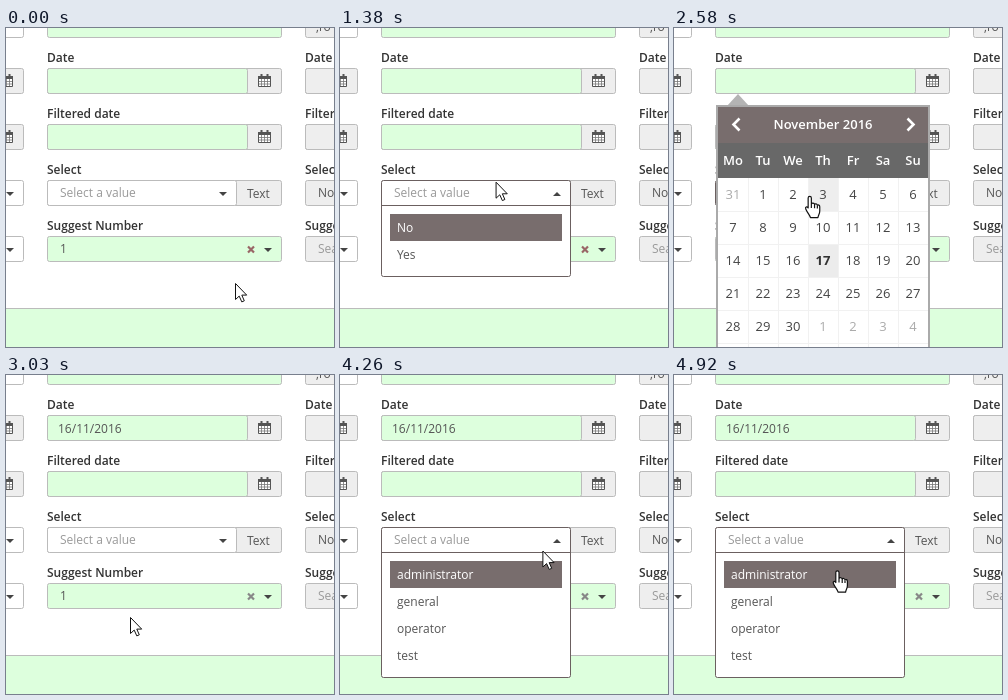
Write an HTML page that moves like this. It is 328 by 319 pixels and loops after 5760 ms.

```html
<!DOCTYPE html>
<html lang="en">
<head>
<meta charset="utf-8">
<title>Form fields</title>
<style>
  html, body { margin: 0; width: 100%; height: 100%; overflow: hidden; background: #fff; }
  svg { display: block; width: 328px; height: 319px; }
  text { font: 12px "Open Sans", sans-serif; fill: #555; white-space: pre; }
  .label { font-weight: 600; fill: #333; }
  .hint { fill: #999; }
  .day { font-size: 13px; text-anchor: middle; fill: #444; }
  .out { fill: #aaa; }
  .today { font-weight: 700; fill: #333; }
  .head { font-size: 13px; font-weight: 600; text-anchor: middle; fill: #fff; }
</style>
</head>
<body>
<svg id="stage" viewBox="0 0 328 319"></svg>
<script>
const LOOP = 5760, STEP = 30;
const GREEN = '#dfd', GREY = '#eee', EDGE = '#bbb', BROWN = '#786d6d', DARK = '#6b6060';
const stage = document.getElementById('stage');

function add(parent, tag, attrs = {}, content) {
  const el = document.createElementNS('http://www.w3.org/2000/svg', tag);
  for (const k in attrs) el.setAttribute(k, attrs[k]);
  if (content !== undefined) el.textContent = content;
  parent.append(el);
  return el;
}
const group = (parent = stage, attrs) => add(parent, 'g', attrs);
const rect = (p, x, y, width, height, fill) => add(p, 'rect', { x, y, width, height, fill });
const path = (p, d, attrs) => add(p, 'path', { d, ...attrs });
const text = (p, x, y, str, cls = '') => add(p, 'text', { x, y, class: cls }, str);
const show = (el, on) => el.setAttribute('visibility', on ? 'visible' : 'hidden');

// Bordered box covering whole pixels from (x, y) to (x2, y2)
function box(p, x, y, x2, y2, fill, stroke = EDGE, rx = 2) {
  return add(p, 'rect', { x: x + .5, y: y + .5, width: x2 - x - 1, height: y2 - y - 1, rx, fill, stroke });
}
const caret = (p, x, y, up) =>
  path(p, up ? `M${x - 4} ${y + 2}h8l-4 -4z` : `M${x - 4} ${y - 2}h8l-4 4z`, { fill: '#444' });

function calendarIcon(p, x, y) {
  const g = group(p, { transform: `translate(${x} ${y})` });
  path(g, 'M.5 2.5h12v10H.5z', { fill: '#fff', stroke: '#555' });
  rect(g, 0, 2, 13, 3, '#555');
  path(g, 'M3.5 5v7M6.5 5v7M9.5 5v7M1 7.5h11M1 10h11', { stroke: '#777', 'stroke-width': .8 });
  path(g, 'M3.5 0v4M9.5 0v4', { stroke: '#555', 'stroke-width': 2 });
}

function column(dx, fill, dates, drawSelects) {
  const g = group(stage, { transform: `translate(${dx} 0)` });
  box(g, 41, -16, 276, 10, fill);
  ['Date', 'Filtered date', 'Select', 'Suggest Number'].forEach((name, i) =>
    text(g, 41, 34 + 56 * i, name, 'label'));
  for (const y of [40, 96]) {
    box(g, 41, y, 276, y + 26, GREY);
    box(g, 41, y, 242, y + 26, dates);
    calendarIcon(g, 252, y + 6);
  }
  drawSelects(g);
  return g;
}

column(-258, '#fff', '#fff', g => {
  for (const y of [152, 208]) {
    box(g, 41, y, 276, y + 26, '#fff');
    caret(g, 262, y + 14);
  }
});
column(258, GREY, GREY, g => {
  text(g, 52, 3, ',ro');
  box(g, 41, 152, 276, 178, GREY);
  text(g, 54, 169, 'No');
  box(g, 41, 208, 276, 234, GREY);
  text(g, 54, 225, 'Search', 'hint');
});
let selectBox, cross;
const main = column(0, GREEN, GREEN, g => {
  box(g, 41, 152, 276, 178, GREY);
  selectBox = box(g, 41, 152, 231, 178, '#fff');
  text(g, 54, 169, 'Select a value', 'hint');
  caret(g, 217, 166);
  text(g, 241, 170, 'Text');
  box(g, 41, 208, 276, 234, GREEN);
  text(g, 54, 225, '1');
  cross = path(g, 'M242 218.5l6 6M248 218.5l-6 6', { 'stroke-width': 2.2 });
  caret(g, 262, 222);
});
const dateText = text(main, 52, 58, '16/11/2016');
const textCaret = rect(main, 52, 45, 1, 17, '#444');

rect(stage, 0, 280, 328, 39, GREEN);
rect(stage, 0, 280, 328, 1, EDGE);

// Drop-down lists
const ROW = 27, TOP = 186;
function dropdown(options) {
  const g = group(), end = TOP + ROW * options.length + 9;
  box(g, 41, 152, 231, end, '#fff', DARK);
  rect(g, 42, 177, 188, 1, DARK);
  text(g, 54, 169, 'Select a value', 'hint');
  caret(g, 217, 166, true);
  const bar = rect(g, 50, TOP, 172, ROW, BROWN);
  const labels = options.map((o, i) => text(g, 57, 204 + ROW * i, o));
  return {
    g,
    mark(y) {
      const row = Math.max(0, Math.min(options.length - 1, Math.floor((y - TOP) / ROW)));
      bar.setAttribute('y', TOP + ROW * row);
      labels.forEach((l, i) => l.style.fill = i === row ? '#fff' : '');
    }
  };
}
const shortList = dropdown(['No', 'Yes']);
const longList = dropdown(['administrator', 'general', 'operator', 'test']);

// Date picker
const picker = group();
path(picker, 'M53 78l11 -12l11 12z', { fill: '#b4b4b4' });
rect(picker, 42, 77, 214, 250, '#aaa');
rect(picker, 44, 79, 210, 36, BROWN);
rect(picker, 44, 115, 210, 35, '#686868');
rect(picker, 44, 150, 210, 170, '#fff');
path(picker, 'M65.5 90.5l-6 6l6 6M233.5 90.5l6 6l-6 6', { fill: 'none', stroke: '#fff', 'stroke-width': 2.6 });
text(picker, 149, 101, 'November 2016', 'head');
['Mo', 'Tu', 'We', 'Th', 'Fr', 'Sa', 'Su'].forEach((d, i) => text(picker, 59 + 30 * i, 137, d, 'head'));
rect(picker, 134, 216, 30, 33, '#ececec');
const hover = rect(picker, 0, 0, 30, 33, '#eee');
for (let i = 0; i < 35; i++) {
  const day = i === 0 ? 31 : (i - 1) % 30 + 1;
  const cls = i === 0 || i > 30 ? ' out' : day === 17 ? ' today' : '';
  text(picker, 59 + i % 7 * 30, 171 + Math.floor(i / 7) * 33, day, 'day' + cls);
}
for (let i = 1; i < 7; i++) rect(picker, 44 + 30 * i, 150, 1, 169, '#f1f1f1');
for (let i = 1; i < 6; i++) rect(picker, 44, 150 + 33 * i, 210, 1, '#f1f1f1');

// Pointer shapes, hot spot at 0,0
const ink = { fill: '#fff', stroke: '#111', 'stroke-linejoin': 'round' };
const pointer = group();
const shapes = {
  arrow: path(pointer, 'M0 0V16L3.7 12.6L6.3 18.4L8.8 17.3L6.3 11.6H11.2Z', ink),
  hand: path(pointer, 'M-1.7 12V2a1.6 1.6 0 0 1 3.2 0V8c.5-1.2 3-1 3.2.6c.6-1 2.6-.8 2.8.8c.8-.8 2.4-.3 2.4 1.4V15c0 3-1.5 4-1.8 6.6H.6c-.4-2-2.9-4.6-4.6-8.4c-1-2.2 1-3 2.3-1.2ZM1.5 8v4M4.7 9v3.4M7.5 10v2.6',
    { ...ink, 'stroke-width': 1.2 }),
  beam: path(pointer, 'M-3 -7.5h2l1 1l1 -1h2M0 -6.5V6.5M-3 7.5h2l1 -1l1 1h2', { fill: 'none', stroke: '#111', 'stroke-width': 1.2 })
};

// time, x, y
const track = [
  [0, 229.5, 255.5], [300, 178, 168], [810, 178, 168], [840, 176.5, 170.5],
  [1080, 160, 244], [1140, 158, 244], [1410, 156, 151], [1440, 156, 150], [1980, 154, 53],
  [2340, 154, 53], [2790, 121, 262], [2940, 124.5, 242.5], [3030, 124.5, 242.5],
  [3570, 207, 167], [4230, 207, 167], [4410, 151.5, 288.5], [4500, 151, 291],
  [4830, 158, 228], [4860, 158, 228], [4890, 161, 211], [4920, 163.5, 195.5], [LOOP, 163.5, 195.5]
];
function place(t) {
  const i = Math.max(1, track.findIndex(k => k[0] > t));
  const [t0, x0, y0] = track[i - 1], [t1, x1, y1] = track[i];
  let p = (t - t0) / (t1 - t0);
  if (t1 - t0 > 100) p = p * p * (3 - 2 * p);
  return [x0 + (x1 - x0) * p, y0 + (y1 - y0) * p];
}
const between = (v, a, b) => v >= a && v < b;

function draw(time) {
  const t = Math.floor(time % LOOP / STEP) * STEP;
  const [x, y] = place(t);
  const openShort = between(t, 450, 1440), openLong = t >= 3810, openPicker = between(t, 2040, 3000);

  show(shortList.g, openShort);
  show(longList.g, openLong);
  show(picker, openPicker);
  shortList.mark(y);
  longList.mark(y);
  show(dateText, t >= 3000);
  show(textCaret, between(t, 2010, 2520));
  selectBox.setAttribute('stroke', between(t, 1440, 3000) ? DARK : EDGE);
  cross.setAttribute('stroke', t < 3000 ? '#966' : '#888');

  const col = Math.floor((x - 44) / 30), row = Math.floor((y - 150) / 33);
  show(hover, openPicker && row >= 0);
  hover.setAttribute('x', 44 + 30 * col);
  hover.setAttribute('y', 150 + 33 * row);

  let shape = 'arrow';
  if (openShort) shape = between(y, TOP, 240) ? 'hand' : 'arrow';
  else if (openLong) shape = between(y, TOP, 294) ? 'hand' : 'arrow';
  else if (between(y, 40, 66) || (!openPicker && between(y, 96, 122))) shape = 'beam';
  else if (openPicker ? y > 150 : between(y, 152, 178) || between(y, 208, 234)) shape = 'hand';
  for (const k in shapes) show(shapes[k], k === shape);
  pointer.setAttribute('transform', `translate(${x} ${y})`);
}

const start = performance.now();
function tick() {
  draw(performance.now() - start);
  requestAnimationFrame(tick);
}
tick();
</script>
</body>
</html>
```
